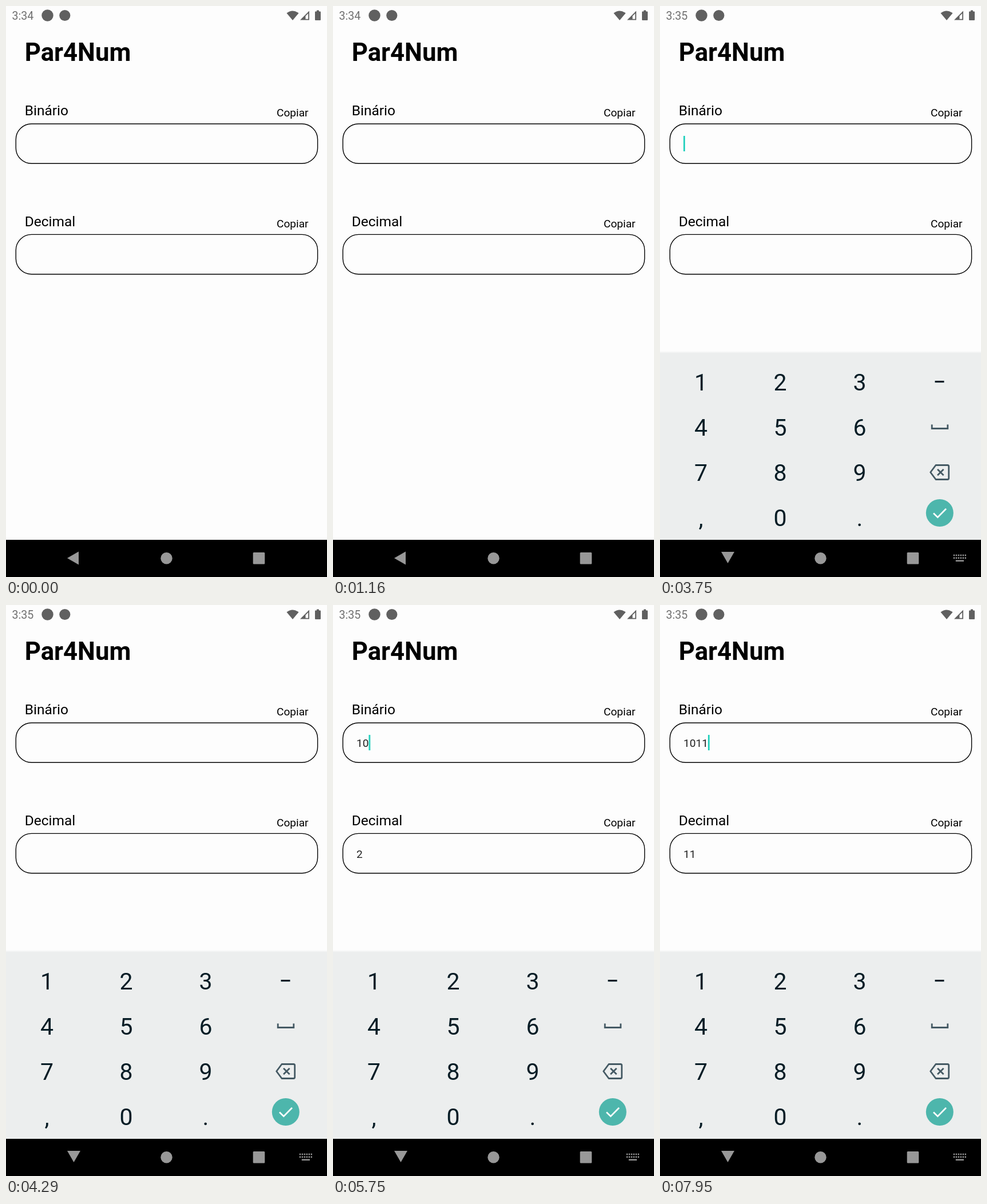
Recreate the animation shown at these times as an HTML page. Size 561x998 px, loop 8000 ms.

```html
<!DOCTYPE html>
<html lang="pt">
<head>
<meta charset="utf-8">
<title>Par4Num</title>
<style>
html, body { margin: 0; width: 100%; height: 100%; overflow: hidden; background: #fdfdfd; }
svg { display: block; width: 100%; height: 100%; font-family: Roboto, sans-serif; }
.title { font-size: 43.7px; font-weight: 700; }
.label { font-size: 24.5px; }
.small { font-size: 19.1px; }
.copy { text-anchor: end; }
.value { fill: #212121; }
.clock { font-size: 19.6px; fill: #707070; }
.status { fill: #606060; }
.nav { fill: #989898; }
.box { fill: none; stroke: #000; stroke-width: 1.4; }
.digits { font-size: 41px; fill: #071d26; text-anchor: middle; }
.icon { fill: none; stroke: #455a64; stroke-width: 2.8; }
.press { fill: #d9dedd; }

/* Hard switches on an 8 s timeline */
.step { animation: 8s step-end infinite; visibility: hidden; }
.old { animation-name: old; visibility: visible; }
.new { animation-name: new; }
.t1 { animation-name: t1; }
.t2 { animation-name: t2; }
.t3 { animation-name: t3; }
.t4 { animation-name: t4; }
.d1 { animation-name: d1; }
.d2 { animation-name: d2; }
.d5 { animation-name: d5; }
.key1 { animation-name: key1; }
.key0 { animation-name: key0; }
.back { animation-name: back; visibility: visible; }
.down { animation-name: down; }
.caret { animation-name: caret; fill: #1ccfbb; }
.keyboard { animation: rise 8s infinite; }

@keyframes old { 25.5% { visibility: hidden } 100% { visibility: hidden } }
@keyframes new { 25.5% { visibility: visible } }
@keyframes t1 { 60% { visibility: visible } }
@keyframes t2 { 68.75% { visibility: visible } }
@keyframes t3 { 80% { visibility: visible } }
@keyframes t4 { 85.375% { visibility: visible } }
@keyframes d1 { 60% { visibility: visible } 68.75% { visibility: hidden } }
@keyframes d2 { 68.75% { visibility: visible } 80% { visibility: hidden } }
@keyframes d5 { 80% { visibility: visible } 85.375% { visibility: hidden } }
@keyframes key1 {
  58.5%, 78.5%, 83.75% { visibility: visible }
  60%, 80%, 85.375% { visibility: hidden }
}
@keyframes key0 { 67.25% { visibility: visible } 68.75% { visibility: hidden } }
@keyframes back { 44.75% { visibility: hidden } 100% { visibility: hidden } }
@keyframes down { 44.75% { visibility: visible } }
@keyframes caret {
  44.25%, 56.75% { visibility: visible; transform: none }
  50.5% { visibility: hidden; transform: none }
  60% { visibility: visible; transform: translateX(10.73px) }
  66.25% { visibility: hidden }
  68.75% { visibility: visible; transform: translateX(21.46px) }
  75% { visibility: hidden }
  80% { visibility: visible; transform: translateX(32.19px) }
  85.375%, 97.875% { visibility: visible; transform: translateX(42.92px) }
  91.625% { visibility: hidden; transform: translateX(42.92px) }
}
@keyframes rise {
  0%, 44.25% { opacity: 0; transform: translateY(33px); animation-timing-function: cubic-bezier(.1, .7, .2, 1) }
  46.75%, 100% { opacity: 1; transform: none }
}
</style>
</head>
<body>
<svg viewBox="0 0 561 998" preserveAspectRatio="none">
  <defs>
    <linearGradient id="edge" x2="0" y2="1">
      <stop stop-color="#fdfdfd"/>
      <stop offset="1" stop-color="#eceeee"/>
    </linearGradient>
  </defs>
  <rect width="561" height="998" fill="#fdfdfd"/>

  <g class="clock">
    <text class="step old" x="10.5" y="24">3:34</text>
    <text class="step new" x="10.5" y="24">3:35</text>
  </g>
  <g class="status">
    <circle cx="72.5" cy="16.5" r="10.2"/>
    <circle cx="102.8" cy="16.5" r="9.6"/>
    <path d="M490.5 12.5Q501 4.500 511.500 12.500L501 25Z"/>
    <path d="M530 8.500V24.500H514ZM528.200 13V22.700H523.500V17.600Z" fill-rule="evenodd"/>
    <path d="M540 10.500q0-1 1-1h2v-2h4v2h2q1 0 1 1V24q0 1-1 1h-8q-1 0-1-1Z"/>
  </g>

  <text class="title" x="32.7" y="96">Par4Num</text>

  <text class="label" x="32.7" y="191">Binário</text>
  <text class="small copy" x="528.5" y="193">Copiar</text>
  <rect class="box" x="17.3" y="206" width="527.3" height="69.3" rx="27.3"/>
  <text class="small value" x="41" y="248"><tspan class="step t1">1</tspan><tspan class="step t2">0</tspan><tspan class="step t3">1</tspan><tspan class="step t4">1</tspan></text>
  <rect class="step caret" x="41" y="227" width="2.7" height="27"/>

  <text class="label" x="32.7" y="384.500">Decimal</text>
  <text class="small copy" x="528.5" y="386.500">Copiar</text>
  <rect class="box" x="17.3" y="399.400" width="527.3" height="69.300" rx="27.3"/>
  <g class="small value">
    <text class="step d1" x="41" y="441.500">1</text>
    <text class="step d2" x="41" y="441.500">2</text>
    <text class="step d5" x="41" y="441.500">5</text>
    <text class="step t4" x="41" y="441.500">11</text>
  </g>

  <g class="keyboard">
    <rect y="606" width="561" height="327" fill="#eceeee"/>
    <rect y="603" width="561" height="4" fill="url(#edge)"/>
    <rect class="press step key1" x="2.700" y="616" width="138.700" height="79"/>
    <rect class="press step key0" x="141.400" y="853" width="138.700" height="79"/>
    <g class="digits">
      <text x="71.5" y="672">1</text><text x="210" y="672">2</text><text x="349" y="672">3</text>
      <text x="71.5" y="751">4</text><text x="210" y="751">5</text><text x="349" y="751">6</text>
      <text x="71.5" y="830">7</text><text x="210" y="830">8</text><text x="349" y="830">9</text>
      <text x="71.5" y="909">,</text><text x="210" y="909">0</text><text x="349" y="909">.</text>
    </g>
    <rect x="480.5" y="655" width="16" height="3.200" fill="#071d26"/>
    <g class="icon">
      <path d="M475.200 731.500V738.500H502.800V731.500"/>
      <path d="M482 802.500H502.500Q504.700 802.500 504.700 804.700V825.300Q504.700 827.500 502.500 827.500H482L472.700 815ZM485 809.700L495.600 820.300M495.600 809.700L485 820.300" stroke-linejoin="round"/>
    </g>
    <circle cx="488.800" cy="886" r="24" fill="#4db6ac"/>
    <path d="M478 886.500L485.300 893.700L500 878.800" fill="none" stroke="#fff" stroke-width="2.700"/>
  </g>

  <rect y="933" width="561" height="65"/>
  <g class="nav">
    <path class="step back" d="M107 965L127 953.500V976.500Z"/>
    <path class="step down" d="M107 954H130L118.500 974Z"/>
    <circle cx="280.500" cy="965.300" r="10.200"/>
    <rect x="431.700" y="955" width="20.600" height="20.600" rx="1.500"/>
    <g class="step down" fill="none" stroke="#989898" stroke-width="2.400">
      <path d="M512.800 960H535M512.800 964.700H535" stroke-dasharray="2.400 1.560"/>
      <path d="M516.800 969.700H531"/>
    </g>
  </g>
</svg>
</body>
</html>
```
